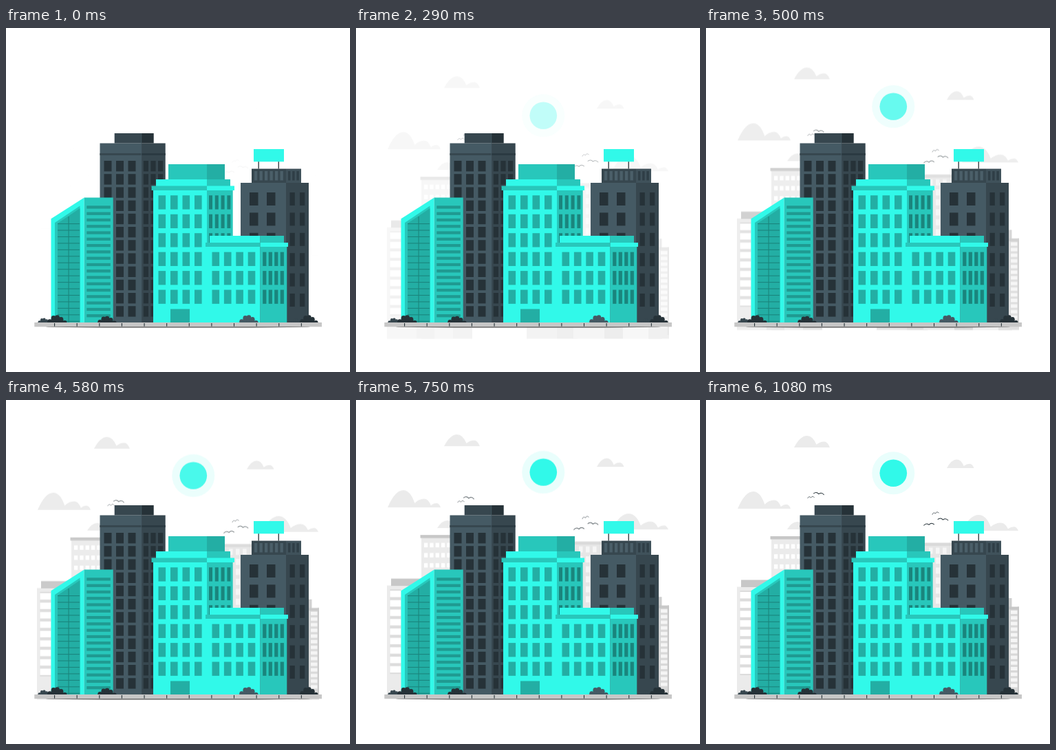
These frames come from a looping animation (500x500 px, 1.12 s). An HTML page with a canvas:

```html
<!DOCTYPE html>
<html lang="en">
<head>
<meta charset="utf-8">
<title>City skyline</title>
<style>
  html, body { margin: 0; width: 100%; height: 100%; overflow: hidden; background: #fff; }
  canvas { display: block; width: 500px; height: 500px; }
</style>
</head>
<body>
<canvas id="stage" width="500" height="500"></canvas>
<script>
const SIZE = 500, LOOP = 1120, FPS = 24, RISE = 30;
const GROUND = 428, FAR_BASE = 433.5;
const CYAN = '#31f9e9', TEAL = '#28c7bb', DEEP = '#23aea4', SHADE = '#1f9a91', LINE = '#1a857d';
const SLATE = '#455a64', DARK = '#37474f', INK = '#263238';
const PALE = '#ebebeb', MIST = '#e0e0e0', GREY = '#c7c7c7', WHITE = '#fff';

let g; // context being drawn on

// Rectangle from its left, top, right and bottom edges
function box(color, l, t, r, b) {
  g.fillStyle = color;
  g.fillRect(l, t, r - l, b - t);
}

// Front and side faces that meet at x = m
function block(front, side, l, m, r, t, b = GROUND) {
  box(front, l, t, m, b);
  box(side, m, t, r, b);
}

// Grid of equal windows
function panes(color, x, y, w, h, cols, rows, dx, dy) {
  g.fillStyle = color;
  for (let r = 0; r < rows; r++)
    for (let c = 0; c < cols; c++) g.fillRect(x + c * dx, y + r * dy, w, h);
}

function disc(color, x, y, r) {
  g.fillStyle = color;
  g.beginPath();
  g.arc(x, y, r, 0, Math.PI * 2);
  g.fill();
}

// Wall face whose top edge slopes up to the right
function slope(color, l, r, yl, yr) {
  g.fillStyle = color;
  g.beginPath();
  g.moveTo(l, yl);
  g.lineTo(r, yr);
  g.lineTo(r, GROUND);
  g.lineTo(l, GROUND);
  g.fill();
}

// A row of n humps, each narrower and lower than the one before
function cloud(x, base, w, h, n) {
  const q = 0.6;
  let bw = w * (1 - q) / (1 - q ** n);
  g.fillStyle = PALE;
  g.beginPath();
  g.moveTo(x, base);
  for (let i = 0; i < n; i++) {
    const peak = x + bw * 0.58, end = x + bw, top = base - h;
    h *= 0.5;
    g.quadraticCurveTo(x + bw * 0.27, top, peak, top);
    g.quadraticCurveTo(x + bw * 0.84, top, end, i < n - 1 ? base - h * 0.5 : base);
    x = end;
    bw *= q;
  }
  g.fill();
}

// Leafy mound of overlapping discs
function bush(color, x, w, h) {
  const n = 5, r = w / n * 0.62;
  for (let i = 0; i < n; i++) {
    const u = (i + 0.5) / n;
    const cx = x + u * w, top = GROUND - h * Math.sin(Math.PI * u ** 0.85);
    disc(color, cx, top + r, r);
    box(color, cx - r, Math.min(top + r, GROUND), cx + r, GROUND);
  }
}

function bird(x, y, w, tilt) {
  g.save();
  g.translate(x, y);
  g.rotate(tilt);
  g.strokeStyle = INK;
  g.lineWidth = w / 16;
  g.beginPath();
  g.moveTo(-w / 2, 1);
  g.quadraticCurveTo(-w / 4, -3, 0, 0.6);
  g.quadraticCurveTo(w / 4, -3, w / 2, 1);
  g.stroke();
  g.restore();
}

function drawBirds() {
  const small = 10, big = 15.5;
  bird(152.5, 141.5, small, -0.1);
  bird(164, 136, big, 0.12);
  bird(333.5, 164.5, small, -0.25);
  bird(344.5, 173.5, big, 0.1);
  bird(324, 180.8, big, -0.1);
}

function drawSun() {
  disc('#e9fefc', 272.3, 106.3, 31);
  disc(CYAN, 272.3, 106.3, 19.8);
}

function drawClouds() {
  cloud(128, 69, 52, 17, 2);
  cloud(46, 158, 77, 25, 3);
  cloud(350, 99, 39.5, 12.5, 2);
  cloud(118, 188, 40, 11, 2);
  cloud(372, 190, 82, 23, 3);
}

function drawFarBlocks() {
  // second from left
  block(PALE, MIST, 95, 141, 169, 202, FAR_BASE);
  box(GREY, 93.5, 198, 169, 202.5);
  panes(WHITE, 99, 209.5, 5.3, 6.5, 5, 3, 8.3, 14.7);
  // far left
  block(PALE, MIST, 45, 88, 114, 271.5, FAR_BASE);
  box(GREY, 51, 261.5, 108, 272);
  box('#dcdcdc', 49.5, 277, 65.5, 400);
  panes(WHITE, 49.5, 279, 16, 9.4, 1, 9, 0, 13.7);
  // middle
  block(MIST, '#d6d6d6', 248, 292, 322, 240, FAR_BASE);
  block('#e6e6e6', '#d0d0d0', 316, 361, 388, 208, FAR_BASE);
  box('#dadada', 316, 207.5, 357, 212);
  panes('#f5f5f5', 324, 214.5, 5.5, 9, 3, 6, 10, 14.5);
  // far right
  box('#d0d0d0', 425, 288, 444.5, FAR_BASE);
  block(PALE, '#d8d8d8', 388, 425, 455, 301, FAR_BASE);
  box(GREY, 440, 300.5, 455, 304.5);
  box(GREY, 452.8, 300.5, 455, GROUND);
  panes('#f5f5f5', 443, 306, 9.5, 5, 1, 14, 0, 8.2);
}

function drawDarkTower() {
  block(SLATE, DARK, 136.5, 197, 231.7, 167.5);
  block(DARK, '#2b3a42', 136.5, 197, 231.7, 182, 185);
  block(DARK, INK, 157.7, 197, 214.7, 153, 167.5);
  box(SLATE, 196.4, 153, 197.2, GROUND);
  panes(INK, 142.5, 193, 11, 15.4, 3, 12, 17.5, 19.2);
  panes(INK, 199.8, 193, 7.2, 15.4, 3, 12, 10.6, 19.2);
}

function drawSlantBlock() {
  slope(CYAN, 65.5, 113.7, 277.3, 246.5);
  box(TEAL, 113.7, 246.5, 155.7, GROUND);
  slope(TEAL, 71, 107.5, 283, 258.5);
  slope(DEEP, 75, 107.5, 284, 262);
  panes(LINE, 75, 284, 32, 1.1, 1, 16, 0, 9.45);
  box(LINE, 90.5, 274, 91.6, GROUND);
  panes(SHADE, 117.3, 258.3, 34.5, 4.3, 1, 18, 0, 9.28);
}

function drawBillboardBlock() {
  block(SLATE, DARK, 341, 407, 440, 225);
  block(DARK, '#40525b', 357, 407, 429, 204.6, 225);
  panes('#4b5f69', 361, 208, 4.3, 13.5, 6, 1, 7.5, 0);
  panes('#2f3e46', 410, 208, 3.4, 13.5, 3, 1, 6.2, 0);
  panes(INK, 366.5, 194, 1.3, 10.6, 2, 1, 29.1, 0);
  box(CYAN, 360, 176, 404, 194.3);
  panes(INK, 354, 239, 12.5, 19, 2, 6, 25, 29.4);
  panes(INK, 412.5, 239, 7.3, 19, 2, 6, 14.5, 29.4);
}

function drawCyanBlocks() {
  const top = 243.3, h = 20.3, pitch = 27.45;
  const windows = (color, x, w, dx, first, rows) =>
    panes(color, x, top + first * pitch, w, h, 4, rows, dx, pitch);

  // tall block
  block(TEAL, DEEP, 236, 292, 318, 198, 220);
  block(CYAN, TEAL, 218, 292, 326, 220, 230);
  block(CYAN, TEAL, 214, 292, 329.7, 236);
  block(TEAL, CYAN, 211.5, 292, 332, 229.5, 236);
  windows(DEEP, 221.5, 10.6, 17.5, 0, 6);
  windows(LINE, 295, 5, 8.8, 0, 3);
  box(DEEP, 239, 408.5, 267, GROUND);

  // low block
  block(CYAN, TEAL, 296, 369.5, 404, 302, 312);
  block(CYAN, TEAL, 292, 369.5, 408.3, 318);
  block(TEAL, CYAN, 290, 369.5, 410, 312, 318);
  windows(DEEP, 299.5, 10.6, 17.4, 3, 3);
  windows(LINE, 373.2, 5.2, 8.5, 3, 3);
}

function drawStreet() {
  bush(DARK, 47, 17, 6.5);
  bush(INK, 61, 27, 11);
  bush(INK, 134, 26, 9.5);
  bush(SLATE, 340, 26, 11);
  bush(DARK, 415, 14, 6);
  bush(INK, 428, 25, 11);

  g.fillStyle = '#4a4a4a';
  g.beginPath();
  g.ellipse(250, 434.3, 192, 1.3, 0, 0, Math.PI * 2);
  g.fill();
  box(GREY, 41.3, GROUND, 459, 434.3);
  panes(INK, 70, 429, 1.1, 4.6, 12, 1, 32.62, 0);
}

// Draws the parts once on a layer of their own
function paint(...parts) {
  const c = document.createElement('canvas');
  c.width = c.height = SIZE;
  g = c.getContext('2d');
  parts.forEach(part => part());
  return c;
}

const city = paint(drawDarkTower, drawSlantBlock, drawBillboardBlock, drawCyanBlocks, drawStreet);
const far = paint(drawClouds, drawFarBlocks);
const sun = paint(drawSun);
const birds = paint(drawBirds);

// cubic-bezier(.36, -.01, .5, 1.38), solved by bisection
const curve = (a, b, s) => 3 * (1 - s) * (1 - s) * s * a + 3 * (1 - s) * s * s * b + s * s * s;
function spring(t) {
  if (t >= 1) return 1;
  let lo = 0, hi = 1;
  for (let i = 0; i < 30; i++) {
    const mid = (lo + hi) / 2;
    if (curve(0.36, 0.5, mid) < t) lo = mid; else hi = mid;
  }
  return curve(-0.01, 1.38, lo);
}

const ctx = document.getElementById('stage').getContext('2d');
const start = performance.now();

// Slides a layer up into place while it fades in
function rise(img, p) {
  ctx.globalAlpha = Math.max(0, Math.min(1, p));
  ctx.drawImage(img, 0, RISE * (1 - p));
}

function frame() {
  const ms = (performance.now() - start) % LOOP;
  const t = (Math.floor((ms + 5) * FPS / 1000) + 1) / FPS;
  ctx.globalAlpha = 1;
  ctx.fillStyle = WHITE;
  ctx.fillRect(0, 0, SIZE, SIZE);
  rise(sun, spring(Math.max(0, t - 0.045)));
  rise(far, spring(t));
  rise(birds, Math.min(1, t));
  rise(city, 1);
  requestAnimationFrame(frame);
}
frame();
</script>
</body>
</html>
```
